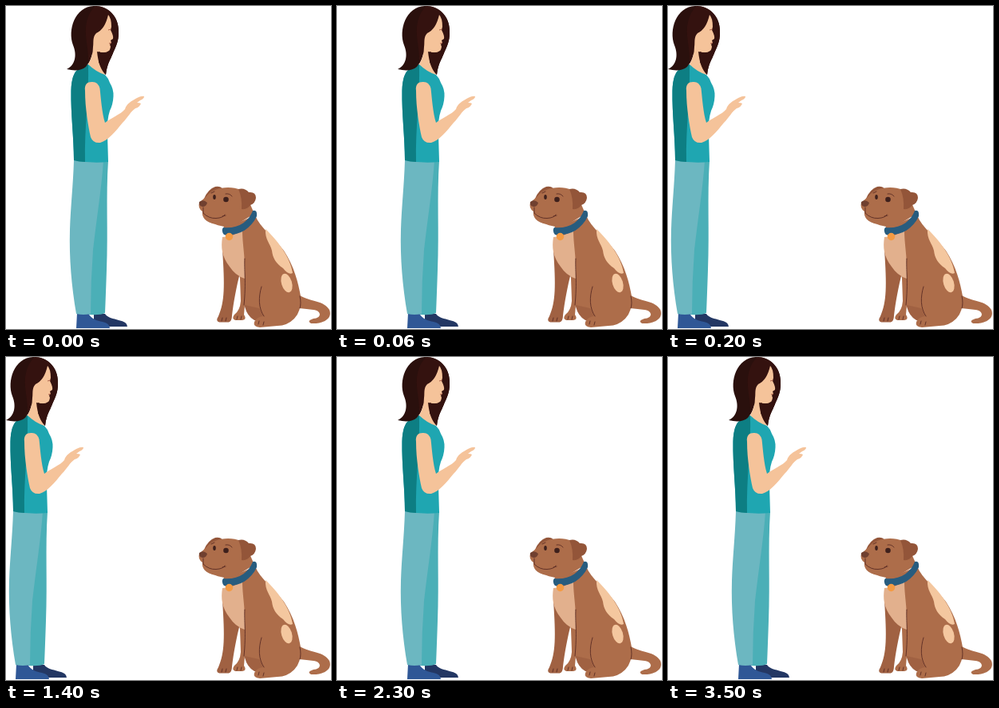
These frames come from a looping animation (407x404 px, 4.3 s). An HTML page:

```html
<!DOCTYPE html>
<html lang="en">
<head>
<meta charset="utf-8">
<title>Woman and dog</title>
<style>
html, body { margin: 0; width: 100%; height: 100%; overflow: hidden; background: #fff; }
svg { display: block; width: 100vw; height: 100vh; }
.near { fill: #6cb7c1; }
.far { fill: #4bafb7; }
.navy { fill: #233763; }
.blue { fill: #2f5796; }
.skin { fill: #f5c39a; }
.fur { fill: #ad6d4a; }
.shade { fill: #a06142; }
.ear { fill: #935539; }
.line { fill: none; stroke: #5b2c24; stroke-width: .9; stroke-linecap: round; }
</style>
</head>
<body>
<svg viewBox="0 0 407 404">
  <g id="stand" class="legs">
    <path class="navy" d="M110 385H124C127 390 135 391 141 393Q152 395 152 401H110Z"/>
    <path class="blue" d="M89 384H103C106 391 114 394 121 395Q130 397 130 403H88Z"/>
    <path class="far" d="M95 193H128C125 240 128 280 126 330Q125 360 124 384Q118 387 104 386Z"/>
    <path class="near" d="M85 193H122C120 225 114 262 109 305Q106 345 106 385Q97 387 88 385C82 350 79 315 80 280C81 250 84 225 85 193Z"/>
  </g>
  <g id="back" class="legs">
    <path class="navy" d="M121 385H136C139 390 146 391 152 392Q162 394 163 400.500H121Z"/>
    <path class="navy" d="M22 362L34 370C30 378 36 386 43 392Q48 397 46 400.500H34C28 397 25 389 18 384Q10 379 12 373Q19 371 22 362Z"/>
    <path class="far" d="M100 275L138 194C136 230 138 275 136 315Q135 350 136 384Q127 387 120 385C116 352 108 317 105 282Z"/>
    <path class="near" d="M94 193H138C137 225 126 258 106 282C94 312 62 344 34 371Q26 368 20 360C33 333 53 314 65 290C77 264 90 232 94 193Z"/>
  </g>
  <g id="front" class="legs">
    <path class="navy" d="M29 385H44C47 390 54 391 60 392Q70 394 71 400.500H29Z"/>
    <path class="navy" d="M103 381L117 379C120 387 128 389 134 390Q144 392 145 399H102Z"/>
    <path class="far" d="M15 220L49 262C47 295 48 318 46 345Q44 367 45 384Q37 387 29 385C25 361 17 330 16 293Q14 255 15 220Z"/>
    <path class="near" d="M9 193H52C59 222 78 246 91 270C106 298 116 343 119 378Q111 382 103 380C99 352 83 327 77 302C68 273 44 264 25 241Q10 224 9 193Z"/>
  </g>

  <g id="torso">
    <path fill="#1fa6b1" d="M103 73L124 86Q128 90 130 96Q135 104 134.500 113Q134 123 130 131Q126 143 127 160L128 195Q106 197 85 193C85 165 81 135 81.500 106Q82 83 92 78Z"/>
    <path fill="#0d7e83" d="M103 73C104 112 98 153 99 195Q91 195 85 193C85 165 81 135 81.500 106Q82 83 92 78Z"/>
    <path class="skin" d="M99 106C98 98 102 95 107 95Q115 94 117.500 103C119 116 120 133 124 146C133 139 143 136 149 129C151 122 157 119 164 115Q170 112 173 113Q173 116 168 118L164 121Q168 121 169 122Q167 127 162 128C156 132 153 139 146 146C137 157 128 168 118 171Q109 172 106 164C103 150 99 128 99 106Z"/>
    <path fill="#2a100d" d="M110 0C128 0 141 13 141 31C142 46 135 55 131 66Q126 75 125 86Q117 78 113 64L104 57Q107 69 100 76Q92 83 76 79C87 74 89 61 84 49C77 30 86 1 110 0Z"/>
    <path fill="#34120f" d="M112 0C128 0 141 13 141 31C142 46 135 55 131 66L109 55Q107 67 103 72C104 52 97 36 101 20Q104 7 112 0Z"/>
    <path class="skin" d="M128 11Q132 15 132 26L131 30Q135 38 134 41L131 43L132 46L130 48L131 51Q130 57 126 58Q120 59 116 57L116 70L124 86Q112 82 103 73Q109 62 109 51C110 46 108 39 113 34Q124 29 128 11Z"/>
    <path fill="#34120f" d="M114 57Q124 60 129 56L134 59Q126 74 125 86Q116 78 114 57Z"/>
    <path d="M128 30l4-1M129 47l3-1" stroke="#9a4938" stroke-width=".8"/>
  </g>

  <g id="dog">
    <path class="fur" d="M366 361C383 371 398 368 405 380C410 393 393 398 382 397Q376 394 385 391C396 390 395 381 385 380Q377 379 367 378Z"/>
    <path class="shade" d="M271 305L294 330C288 353 285 371 283 387Q283 394 279 395.500H267Q262 394 266 388C274 370 274 350 271 305Z"/>
    <path class="shade" d="M297 340H322V396L311 393Q302 388 299 376Z"/>
    <path class="fur" d="M272 279L312 262C318 277 336 290 348 306C361 326 366 346 369 363Q370 382 361 391Q352 400 340 400L318 402Q309 401 311 395Q314 389 322 388L317 378L299 374L298 386Q302 392 296 393H287Q282 391 286 386Q293 381 294 369L293 340Z"/>
    <path fill="#e2b08d" d="M271 289Q284 289 296 280C296 300 300 313 299 341Q287 337 280 326C270 313 269 302 271 289Z"/>
    <path fill="#f4c79f" d="M325 279C342 295 356 315 359 334Q354 337 347 328C338 322 334 315 333 306C331 297 324 292 325 279Z"/>
    <ellipse cx="351.500" cy="346.500" rx="6.500" ry="12" fill="#f4c79f" transform="rotate(-17 351.500 346.500)"/>
    <path class="line" d="M299 316C298 330 301 345 298 374M320 351C316 364 316 378 323 388M316 398l1-4M322 399l1-4M270 394l1-4M275 394l1-4M289 392l1-4M294 392l1-4M368 363Q370 372 368 378"/>
    <path class="fur" d="M271 268L305 246L311 260L274 282Z"/>
    <path class="ear" d="M248 241Q253 229 262 226Q269 225 271 229L260 240Z"/>
    <path class="fur" d="M251 238C259 227 280 224 294 230C306 237 306 255 297 265C287 277 275 278 262 273C249 270 245 264 246 257Q240 253 242 246Z"/>
    <path class="ear" d="M291 229Q299 227 304 233Q313 232 313 240Q312 247 306 249Q302 255 295 254Q296 240 291 229Z"/>
    <path fill="#704030" d="M242 245Q247 241 252 246Q251 251 246 251Q241 250 242 245Z"/>
    <ellipse cx="261" cy="239" rx="1.800" ry="3" fill="#3e201c"/>
    <circle cx="275.500" cy="242" r="3.300" fill="#3e201c"/>
    <path class="line" d="M247 252L247 259Q254 266 263 265.500Q272 265 274 261M271 263l4-1M275 235Q280 234 283 238M257 234l4-2"/>
    <path fill="#285c7e" d="M272 277C290 279 304 270 309 256Q315 254 314 263C306 280 290 288 273 286Q269 281 272 277Z"/>
    <circle cx="279.500" cy="288.500" r="4.700" fill="#f49b43"/>
  </g>
</svg>
<script>
const LOOP = 4300;
// start time, torso shift, leg pose, leg shift
const poses = [
  [0, 0, "stand", 0],
  [100, 10, "back", 0],
  [200, -76, "stand", -76],
  [2200, -76, "front", 0],
  [2300, 0, "stand", 0]
];
const torso = document.getElementById("torso");
const legs = document.querySelectorAll(".legs");
const shift = (el, x) => el.setAttribute("transform", `translate(${x} 0)`);

function draw() {
  const t = performance.now() % LOOP;
  const [, bodyX, pose, legX] = poses.filter(p => p[0] <= t).pop();
  shift(torso, bodyX);
  for (const leg of legs) {
    leg.style.display = leg.id === pose ? "" : "none";
    shift(leg, legX);
  }
  requestAnimationFrame(draw);
}
draw();
</script>
</body>
</html>
```
